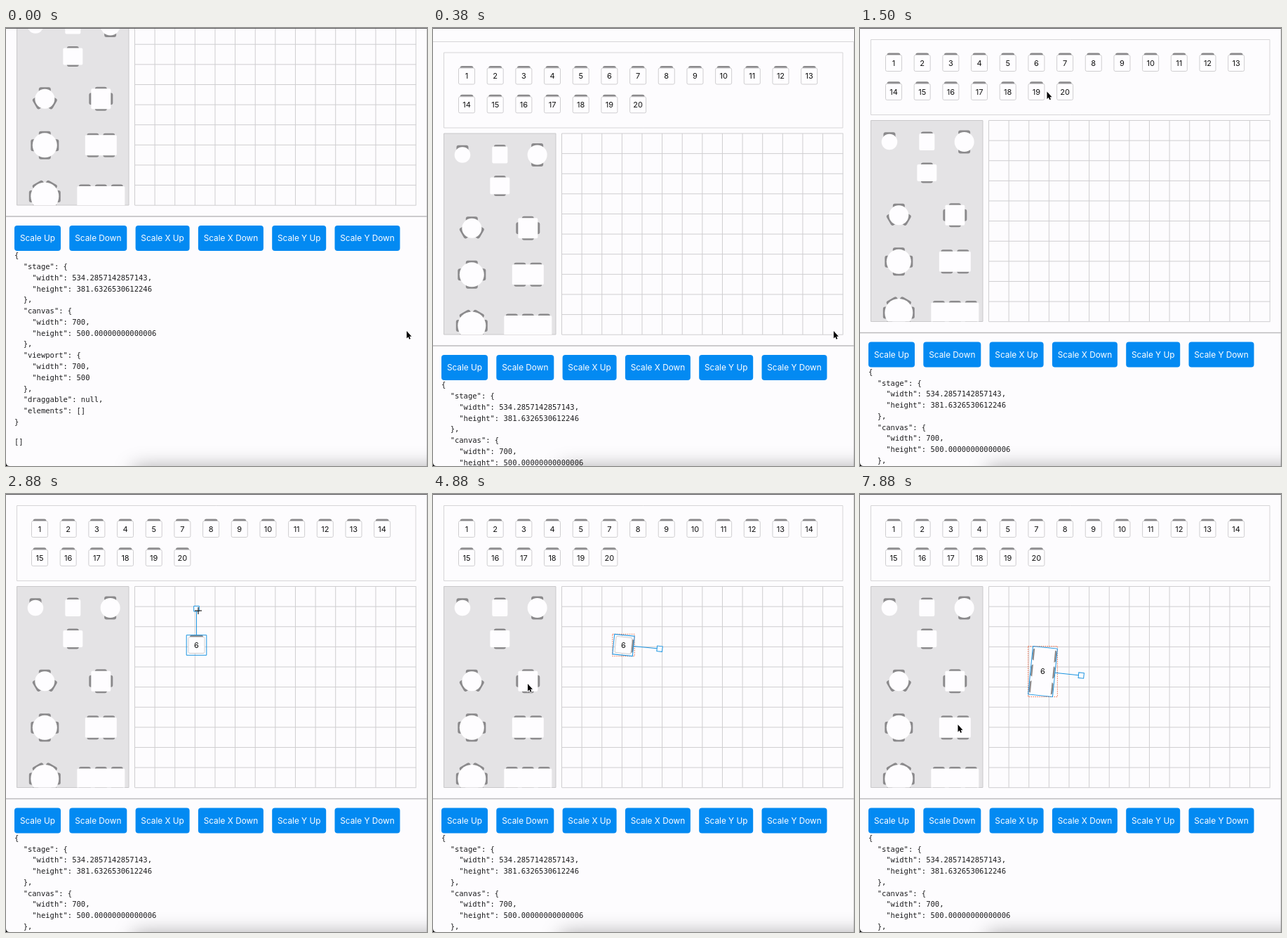
Recreate the animation shown at these times as an HTML page with a canvas. Size 600x623 px, loop 8 s.

```html
<!DOCTYPE html>
<html>
<head>
<meta charset="utf-8">
<style>
html, body { margin: 0; width: 100%; height: 100%; overflow: hidden; background: #fdfcfe; }
canvas { display: block; }
</style>
</head>
<body>
<canvas id="stage" width="600" height="623"></canvas>
<script>
const ctx = document.getElementById('stage').getContext('2d');
const LOOP = 8000, STEP = 125;
const PAPER = '#fdfcfe', WHITE = '#fefdff', LINE = '#cfced0', SEAT = '#8b8a8c', BLUE = '#1c94e0';
const UI_FONT = 'Inter, sans-serif', MONO = '10.5px "DejaVu Sans Mono", monospace';

// Key moments of the interaction, in ms
const DROP_CHAIR = 2125, SELECT = 2375, GRAB_HANDLE = 2750, ROTATE = 3125, ROTATED = 4000,
  RELEASE = 4125, DROP_SQUARE = 5500, DROP_LONG = 6500, PUSH = 6750, PUSHED = 7125;

// Pointer moves: start, end, x, y
const MOVES = [
  [625, 1250, 266.5, 90.5],
  [1500, 1625, 252, 51],
  [1750, DROP_CHAIR, 273, 216],
  [2500, GRAB_HANDLE, 274, 166],
  [ROTATE, ROTATED, 323, 220],
  [RELEASE, 4500, 106, 268],
  [4500, 4875, 135, 270],
  [5000, 5375, 262, 212],
  [DROP_SQUARE, 5875, 135, 396],
  [6000, 6375, 247.5, 212.5],
  [PUSH, PUSHED, 236.5, 250],
  [7125, 7750, 139.5, 328],
];

const rad = deg => deg * Math.PI / 180;
const mix = (a, b, p) => a + (b - a) * p;

function ramp(t, start, end) {
  const p = Math.min(1, Math.max(0, (t - start) / (end - start)));
  return p * p * (3 - 2 * p);
}

// The page flies past its top edge, then settles back
function scrollAt(t) {
  return t < 375 ? mix(-165.5, 18.5, ramp(t, 0, 375))
    : 18.5 * (1 - Math.min(1, (t - 375) / 800)) ** 2;
}

const angleAt = t => 95.8 * ramp(t, ROTATE, ROTATED);

function pointerAt(t) {
  let x = 571, y = 431;
  for (const [start, end, toX, toY] of MOVES) {
    const p = ramp(t, start, end);
    x = mix(x, toX, p);
    y = mix(y, toY, p);
  }
  if (t > ROTATE && t < ROTATED) {
    const a = rad(angleAt(t));
    x = 271.5 + 52 * Math.sin(a);
    y = 215 - 52 * Math.cos(a);
  }
  return [x, y];
}

function placed(x, y, draw, angle = 0) {
  ctx.save();
  ctx.translate(x, y);
  ctx.rotate(rad(angle));
  draw();
  ctx.restore();
}

function box(x, y, w, h, fill, stroke, radius = 0) {
  ctx.beginPath();
  ctx.roundRect(x, y, w, h, radius);
  if (fill) { ctx.fillStyle = fill; ctx.fill(); }
  if (stroke) { ctx.strokeStyle = stroke; ctx.stroke(); }
}

function line(x1, y1, x2, y2, color, width = 1) {
  ctx.strokeStyle = color;
  ctx.lineWidth = width;
  ctx.beginPath();
  ctx.moveTo(x1, y1);
  ctx.lineTo(x2, y2);
  ctx.stroke();
  ctx.lineWidth = 1;
}

function text(str, x, y, font, color, align = 'center') {
  ctx.font = font;
  ctx.fillStyle = color;
  ctx.textAlign = align;
  ctx.textBaseline = 'middle';
  ctx.fillText(str, x, y);
}

function seat(angle, dist, offset = 0) {
  placed(0, 0, () => box(offset - 8.5, -dist, 17, 7, SEAT, null, [3, 3, 0, 0]), angle);
}

const roundTable = (r, seats, turn = 0) => () => {
  for (let i = 0; i < seats; i++) seat(turn + i * 360 / seats, r + 2.5);
  box(-r, -r, 2 * r, 2 * r, WHITE, null, r);
};

const rectTable = (w, h, perSide, angles) => () => {
  for (const a of angles)
    for (let i = 0; i < perSide; i++) seat(a, h / 2 + 2.5, (i - (perSide - 1) / 2) * 23);
  box(-w / 2, -h / 2, w, h, WHITE, null, 2);
};

const squareTable = rectTable(28, 29, 1, [0, 90, 180, 270]);
const longTable = rectTable(68, 29, 3, [0, 180]);
const PALETTE = [
  [162, roundTable(11.3, 1), rectTable(22, 24, 1, [0]), roundTable(14, 2)],
  [206, rectTable(28, 24, 1, [0, 180])],
  [266.3, roundTable(14, 3), squareTable],
  [332.3, roundTable(17.5, 4), rectTable(45, 29, 2, [0, 180])],
  [405, roundTable(20, 6, 30), longTable],
];

function chair() {
  box(-9.5, -14.5, 19, 7, SEAT, null, [3, 3, 0, 0]);
  box(-11.5, -11.5, 23, 23, WHITE, LINE, 2);
}

const label = (n, x, y) => text(n, x, y + 0.5, '11px ' + UI_FONT, '#111');

function tray(taken) {
  box(15.5, 16.5, 568.5, 107, null, '#d6d5d7');
  for (let slot = 0; slot < (taken ? 19 : 20); slot++) {
    const n = slot + (taken && slot + 1 >= taken ? 2 : 1);
    const x = 48 + slot % 13 * 40.68, y = slot < 13 ? 50 : 90.8;
    placed(x, y, chair);
    label(n, x, y);
  }
}

function sidebar() {
  ctx.save();
  box(15.5, 131.5, 159.5, 286, '#e4e3e5', '#c9c8ca');
  ctx.clip();
  for (const [y, ...tables] of PALETTE)
    tables.forEach((draw, i) => placed(15.3 + 160 * (i + 0.5) / tables.length, y, draw));
  ctx.restore();
}

function grid() {
  const left = 183.5, top = 131.5, cell = 28.62;
  for (let i = 0; i <= 14; i++) line(left + i * cell, top, left + i * cell, 417.5, LINE);
  for (let i = 0; i <= 10; i++) line(left, top + i * cell, 584.5, top + i * cell, LINE);
}

const size = (width, height) => ({ width, height });
const STATE = JSON.stringify({
  stage: size(534.2857142857143, 381.6326530612246),
  canvas: size(700, 500.00000000000006),
  viewport: size(700, 500),
  draggable: null,
  elements: [],
}, null, 2).split('\n');

function controls() {
  line(0, 433.5, 600, 433.5, '#bcbbbd', 1.5);
  let x = 12;
  for (const axis of ['', 'X ', 'Y ']) {
    for (const way of ['Up', 'Down']) {
      const w = 66 + (axis ? 11 : 0) + (way === 'Down' ? 16 : 0);
      box(x, 446.5, w, 36, '#038af2', null, 4);
      text(`Scale ${axis}${way}`, x + w / 2, 465, '11.8px ' + UI_FONT, '#fff');
      x += w + 12.3;
    }
  }
  STATE.forEach((s, i) => text(s, 12, 490 + i * 15.78, MONO, '#1c1c1e', 'left'));
  text('[]', 12, 754.5, MONO, '#1c1c1e', 'left');
}

function element(t) {
  if (t < DROP_CHAIR) return;
  const angle = angleAt(t), push = ramp(t, PUSH, PUSHED);
  const x = 271.5 - 11 * push, y = 215 + 37.5 * push;
  const [draw, w, h] = t < DROP_SQUARE ? [chair, 28.6, 28.6]
    : t < DROP_LONG ? [squareTable, 35, 35] : [longTable, 68.7, 35];
  placed(x, y, draw, angle);
  if (t >= SELECT) {
    if (angle > 0) {
      const c = Math.abs(Math.cos(rad(angle))), s = Math.sin(rad(angle));
      const bw = w * c + h * s, bh = w * s + h * c;
      ctx.setLineDash([1.5, 1.5]);
      box(x - bw / 2, y - bh / 2, bw, bh, null, '#ee6a45');
      ctx.setLineDash([]);
    }
    placed(x, y, () => {
      box(-w / 2, -h / 2, w, h, null, BLUE);
      line(0, -h / 2, 0, -h / 2 - 33.5, BLUE);
      box(-3.8, -h / 2 - 41.3, 7.6, 7.6, WHITE, BLUE);
    }, angle);
  }
  label(6, x, y);
}

// Translucent copy that follows the pointer during a drag
function ghost(t, x, y) {
  ctx.globalAlpha = 0.6;
  if (t > 1750 && t < DROP_CHAIR) {
    placed(x - 1, y - 1, chair);
    label(6, x - 1, y - 1);
  }
  if (t > 5000 && t < DROP_SQUARE) placed(x, y - 4, squareTable);
  if (t > 6000 && t < DROP_LONG) placed(x - 1, y + 8, longTable);
  ctx.globalAlpha = 1;
}

const ARROW = new Path2D('M0 0V10.4L2.3 8.3 3.8 11.8 5.5 11.1 4 7.7H7Z');

function pointer(t, x, y) {
  if (t >= GRAB_HANDLE && t <= RELEASE) {
    line(x - 5, y, x + 5, y, '#222', 1.2);
    line(x, y - 5, x, y + 5, '#222', 1.2);
    return;
  }
  placed(x, y, () => {
    ctx.strokeStyle = WHITE;
    ctx.lineWidth = 1.4;
    ctx.stroke(ARROW);
    ctx.fillStyle = '#000';
    ctx.fill(ARROW);
  });
}

function windowEdges() {
  ctx.fillStyle = '#5c5b5d';
  ctx.fillRect(0, 0, 600, 1);
  ctx.save();
  ctx.shadowColor = 'rgba(0,0,0,0.35)';
  ctx.shadowBlur = 28;
  ctx.fillRect(182, 625, 520, 60);
  ctx.restore();
  ctx.fillStyle = '#000';
  ctx.fill(new Path2D('M0 618Q0 623 5 623H0Z'));
}

function render(now) {
  const t = Math.floor(now % LOOP / STEP) * STEP;
  const [x, y] = pointerAt(t);
  ctx.fillStyle = PAPER;
  ctx.fillRect(0, 0, 600, 623);
  placed(0, scrollAt(t), () => {
    line(0, 1, 600, 1, '#d6d5d7');
    line(599.5, 1, 599.5, 800, '#dddcde');
    tray(t < DROP_CHAIR ? 0 : 6);
    sidebar();
    grid();
    controls();
    element(t);
  });
  windowEdges();
  ghost(t, x, y);
  pointer(t, x, y);
}

const start = performance.now();
function tick() {
  render(performance.now() - start);
  requestAnimationFrame(tick);
}
tick();
</script>
</body>
</html>
```
